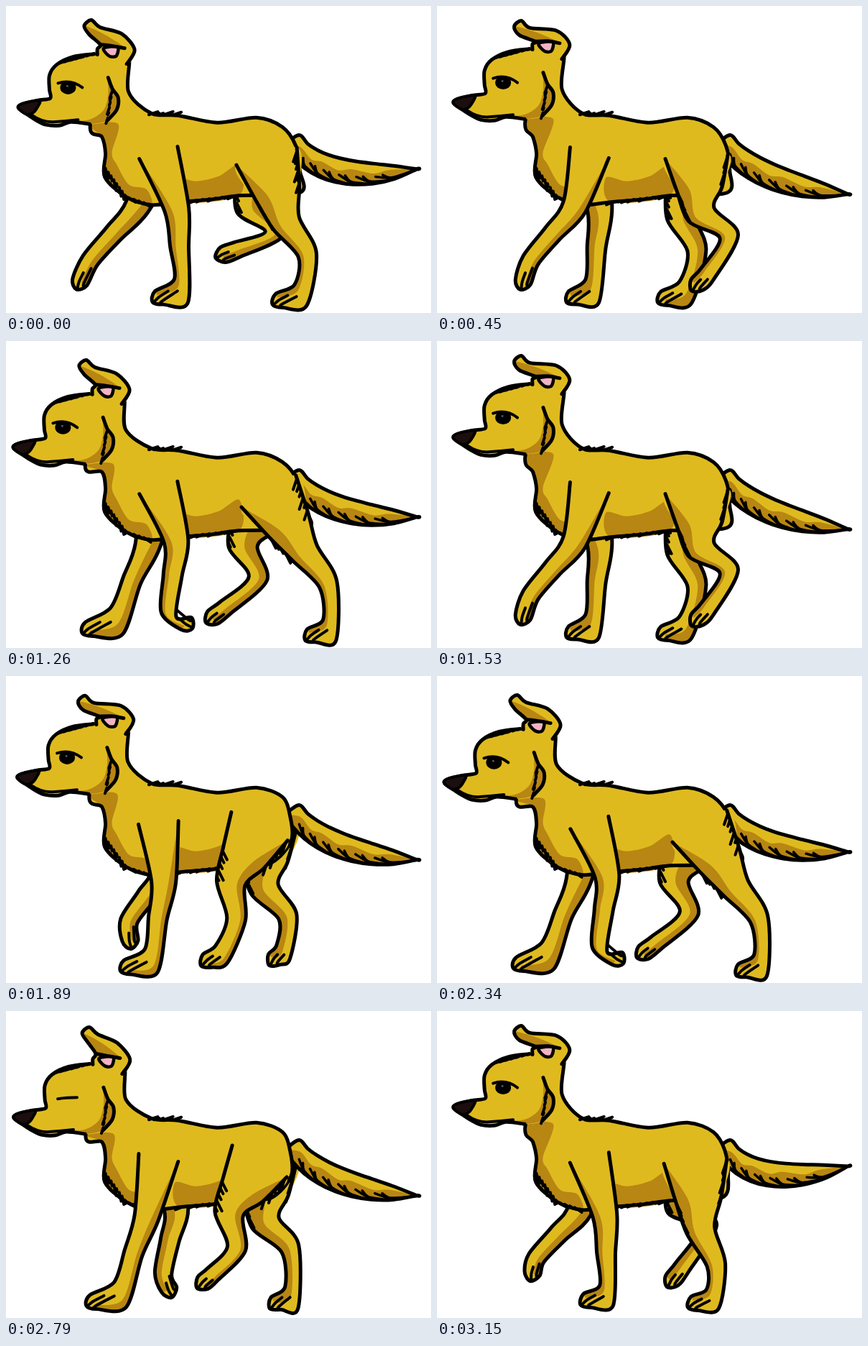
These frames come from a looping animation (592x427 px, 3240 ms). An HTML page:

```html
<!DOCTYPE html>
<html lang="en">
<head>
<meta charset="utf-8">
<title>Walking dog</title>
<style>
html, body { margin: 0; width: 100%; height: 100%; overflow: hidden; background: #fff; }
svg { display: block; width: 592px; height: 427px; }
</style>
</head>
<body>
<svg id="stage" viewBox="0 0 592 427" stroke-linecap="round" stroke-linejoin="round"></svg>
<script>
const STEP = 90, STEPS = 36, CYCLE = 12, BLINK = 31;
const GOLD = '#dfba1f', SHADE = '#b88612', INK = '#000', PINK = '#f3b3c4';
const stage = document.getElementById('stage');

// Key phases of the walk. A leg key holds its lower joint and its toe.
const PHASES = [0, 2, 5, 7, 10, 11];
const keys = text => text.split(' ').map(key => key.split(',').map(Number));
const walk = {
  foreNear: keys('246,387,214,408 228,375,252,395 131,355,120,386 160,387,122,407 225,388,195,406 238,389,210,405'),
  foreFar: keys('118,355,103,386 155,381,116,403 218,388,190,408 220,365,228,390 147,335,143,363 139,345,133,367'),
  hindNear: keys('421,348,382,412 450,340,427,412 408,322,363,390 322,332,275,380 336,345,300,408 390,355,360,409'),
  hindFar: keys('375,318,303,348 352,332,288,387 363,342,318,409 397,332,377,409 388,334,364,388 378,302,328,377'),
  tailTip: keys('228 246 263 258 251 217')
};

// Cyclic cubic interpolation between the keys.
function sample(list, phase) {
  const n = PHASES.length;
  const key = i => list[(i + n) % n];
  const time = i => PHASES[(i + n) % n] + CYCLE * Math.floor(i / n);
  let i = n - 1;
  while (PHASES[i] > phase) i--;
  const span = time(i + 1) - time(i), u = (phase - time(i)) / span;
  const slope = (j, k) => (key(j + 1)[k] - key(j - 1)[k]) / (time(j + 1) - time(j - 1)) * span;
  return key(i).map((value, k) =>
    (1 + 2 * u) * (1 - u) ** 2 * value + u * (1 - u) ** 2 * slope(i, k) +
    u * u * (3 - 2 * u) * key(i + 1)[k] + u * u * (u - 1) * slope(i + 1, k));
}

const pts = text => keys(text);
const mix = (a, b, t) => [a[0] + (b[0] - a[0]) * t, a[1] + (b[1] - a[1]) * t];
const add = (p, x, y) => [p[0] + x, p[1] + y];
const clamp = (v, lo, hi) => Math.max(lo, Math.min(hi, v));
const num = v => v.toFixed(1);
const wave = (phase, peak) => Math.cos((phase - peak) * Math.PI / 3);

// Unit normal of a to b; it points to the dog's front when b lies below a.
function normal(a, b) {
  const dx = b[0] - a[0], dy = b[1] - a[1], d = Math.hypot(dx, dy) || 1;
  return [-dy / d, dx / d];
}

// Middle joint of a limb: it bulges out as the ends come closer than the full reach.
function bend(a, b, at, reach, amount) {
  const d = Math.hypot(b[0] - a[0], b[1] - a[1]);
  const bulge = Math.sqrt(Math.max(0, reach * reach - d * d)) * amount;
  const n = normal(a, b);
  return add(mix(a, b, at), n[0] * bulge, n[1] * bulge);
}

// Smooth curve through the points.
function curve(points, closed = false) {
  const n = points.length;
  const at = i => closed ? points[(i + n) % n] : points[clamp(i, 0, n - 1)];
  let d = 'M' + points[0].map(num);
  for (let i = 0; i < (closed ? n : n - 1); i++) {
    const [a, b, c, e] = [at(i - 1), at(i), at(i + 1), at(i + 2)];
    d += 'C' + [b[0] + (c[0] - a[0]) / 6.5, b[1] + (c[1] - a[1]) / 6.5,
      c[0] - (e[0] - b[0]) / 6.5, c[1] - (e[1] - b[1]) / 6.5, ...c].map(num);
  }
  return closed ? d + 'Z' : d;
}

const fill = (d, color) => `<path d="${d}" fill="${color}"/>`;
const ink = (d, width = 5) => `<path d="${d}" fill="none" stroke="${INK}" stroke-width="${width}"/>`;

// Row of hair strokes of uneven length between two points.
function fur(a, b, count, dx, dy, width = 4) {
  let d = '';
  for (let i = 0; i < count; i++) {
    const p = mix(a, b, (i + .5) / count), size = .7 + .4 * Math.sin(i * 2.4 + 1);
    d += `M${p.map(num)}l${num(dx * size)},${num(dy * size)}`;
  }
  return ink(d, width);
}

// Both sides of a chain of joints with the given half widths.
function sides(joints, widths) {
  const front = [], rear = [];
  joints.forEach((p, i) => {
    const a = normal(joints[Math.max(0, i - 1)], joints[Math.max(1, i)]);
    const b = normal(joints[Math.min(i, joints.length - 2)], joints[Math.min(i + 1, joints.length - 1)]);
    const x = a[0] + b[0], y = a[1] + b[1], k = widths[i] / (Math.hypot(x, y) || 1);
    front.push(add(p, x * k, y * k));
    rear.push(add(p, -x * k, -y * k));
  });
  return { front, rear };
}

function limb(joints, widths, depth) {
  const { front, rear } = sides(joints, widths);
  const last = joints.length - 1, toe = joints[last], ankle = joints[last - 1];
  const planted = clamp((toe[1] - 388) / 15, 0, 1);
  const n = normal(ankle, toe);
  const tip = add(toe, n[1] * 11, -n[0] * 11);
  rear[last - 1] = mix(rear[last - 1], [ankle[0] + 8, toe[1] + 7], planted);
  const outline = [...front, tip, ...[...rear].reverse()];
  const [dark, other] = toe[0] < joints[0][0] - 35 ? [rear, front] : [front, rear];
  const inner = dark.map((p, i) => mix(p, other[i], i ? depth : 0));
  const claw = shift => curve([
    mix(tip, rear[last], shift), mix(toe, front[last], .2 - shift),
    mix(mix(ankle, toe, .55), front[last], .2 - shift)]);
  return fill(curve(outline, true), GOLD) +
    fill(curve(dark) + curve(inner.reverse()).replace('M', 'L') + 'Z', SHADE) +
    ink(curve(outline)) + ink(claw(.1) + claw(.75), 4);
}

function foreleg([x, y, toeX, toeY], depth) {
  const shoulder = [213, 205], wrist = [x, y];
  const elbow = bend(shoulder, wrist, .45, 193, -.2);
  return limb([shoulder, elbow, mix(elbow, wrist, .5), wrist, [toeX, toeY]], [28, 17, 13, 12, 11], depth);
}

function hindleg([x, y, toeX, toeY], hip, depth) {
  const hock = [x, y], toe = [toeX, toeY];
  const knee = bend(hip, hock, .65, 155, .25);
  const ankle = add(mix(hock, toe, .75), clamp((toeY - 385) * .75, 2, 21), 0);
  const joints = [hip, mix(hip, knee, .55), knee, hock, ankle, toe], widths = [44, 32, 20, 13, 11, 11];
  const { front, rear } = sides(joints, widths);
  return limb(joints, widths, depth) +
    fur(front[1], front[2], 5, 6, 12) + fur(rear[0], rear[1], 6, -5, 15);
}

function tail(tipY) {
  const root = [400, 188], tip = [574, tipY], middle = [464, 232 + (tipY - 240) * .2];
  const control = add(mix(root, tip, .5), 2 * (middle[0] - 487), 2 * (middle[1] - (188 + tipY) / 2));
  const spine = [], widths = [];
  for (let u = 0; u < 1.01; u += .125) {
    spine.push(mix(mix(root, control, u), mix(control, tip, u), u));
    widths.push((12 + 5 * Math.sin(Math.PI * u)) * (1 - u ** 8));
  }
  const { front: lower, rear: upper } = sides(spine, widths);
  let hair = '';
  for (let i = 1; i < 7; i++) {
    for (const t of [.15, .65]) {
      const from = mix(mix(lower[i], lower[i + 1], t), upper[i], .32);
      hair += curve([from, mix(lower[i + 1], from, .3), mix(lower[i + 1], lower[i + 2], t)]);
    }
  }
  const outline = [...upper, ...[...lower].reverse()];
  const dark = [...lower, ...spine.slice(1).reverse().map((p, i) => mix(p, upper[7 - i] || p, i % 2 * .25))];
  return fill(curve(outline, true), GOLD) + fill(curve(dark, true), SHADE) +
    ink(curve(outline, true)) + ink(hair, 3.5);
}

// Torso and neck; the neck follows the head and the rump follows the hind leg.
function body(bob, swing) {
  const neck = p => add(p, ...bob);
  const back = pts('203,150 240,153 295,163 350,156 386,169');
  const rump = [[403 + swing * .08, 195], [408 + swing * .12, 230], [402 + swing * .4, 261]];
  const belly = pts('325,265 290,270 243,274 203,278');
  const chest = pts('168,267 138,239 139,206 134,183');
  const throat = neck([119, 165]);
  const outline = [neck([173, 66]), add([172, 119], bob[0] * .6, bob[1] * .5), ...back, ...rump,
    ...belly, ...chest, throat, neck([148, 62])];
  const chestShade = [throat, ...[...chest].reverse(), belly[3],
    ...pts('196,256 172,250 155,222 148,205'), neck([158, 163])];
  const bellyShade = [belly[2], belly[0], ...pts('326,222 297,238 265,245 236,240')];
  return fill(curve(outline, true), GOLD) + fill(curve(chestShade, true), SHADE) +
    fill(curve(bellyShade, true), SHADE) + ink(curve(outline, true)) +
    fur([137, 224], chest[0], 8, 3, 14) + fur(chest[0], belly[3], 5, 9, 6) +
    fur(belly[0], belly[2], 9, -10, 4) + fur([196, 152], [238, 152], 6, 12, -4);
}

const skull = pts('150,66 125,65 95,69 72,80 62,95 62,115 63,127 45,130 22,136 19,141 30,149 44,158 57,164 76,165 92,160 118,163');
const cheek = pts('144,98 150,114 158,126 156,143 143,158');
const nose = pts('18,140 25,134 48,130 45,140 38,148 29,149');

function head(bob, shut, droop) {
  const eye = shut ? ink('M80,114Q92,112 107,112', 4) :
    '<ellipse cx="88" cy="112" rx="11" ry="9.5"/>' + ink('M74,106Q92,100 108,112', 4) +
    '<circle cx="87" cy="110" r="1.5" fill="#55555c"/>';
  const tip = [118 - 11 * droop, 19 + 12 * droop];
  const rim = [add(tip, -5, 4), add(tip, 5, -4), add(tip, 17, 6)];
  const fold = add(tip, 2, 16), crease = [133, 51 + 4 * droop], hinge = [167, 57];
  const ear = [[129, 66], [129, 58], crease, fold, ...rim, [163, 36 + 4 * droop], [181, 59], [170, 79]];
  const pink = pts('138,57 157,55 156,67 149,69 142,65');
  return `<g transform="translate(${bob.map(num)})">` +
    fill(curve([...skull, ...pts('140,160 154,146 156,120 156,85')], true), GOLD) +
    fill(curve([...cheek, ...pts('118,163 92,161 120,156 138,143 144,122')], true), SHADE) +
    ink(curve(skull.slice(1))) + ink(curve(cheek)) + fur(cheek[1], cheek[4], 6, -3, 9) +
    fur([72, 79], [125, 65], 7, 12, -4) + ink('M38,151Q52,161 68,160T102,157', 4) +
    fill(curve(nose, true), '#1c0e0e') + ink(curve(nose, true), 4) + eye +
    fill(curve(ear, true), GOLD) +
    fill(curve([crease, fold, rim[0], mix(tip, hinge, .45), hinge], true), SHADE) +
    fill(curve(pink, true), PINK) + ink(curve(pink, true), 4.5) +
    ink(curve([crease, [150, 54], hinge])) + ink(curve(ear)) + '</g>';
}

function draw(step) {
  const phase = step % CYCLE;
  const pose = {};
  for (const part in walk) pose[part] = sample(walk[part], phase);
  const bob = [-2 + 7 * wave(phase, 4.6), 2 - 8 * wave(phase, 4.5)];
  const droop = .55 - .65 * wave(phase, 1);
  const swing = pose.hindNear[0] - 400;
  stage.innerHTML = '<g transform="scale(.997 .995)">' +
    hindleg(pose.hindFar, [362, 212], .45) + foreleg(pose.foreFar, .4) +
    tail(pose.tailTip[0]) + body(bob, swing) +
    hindleg(pose.hindNear, [362 + swing * .1, 210], .28) + foreleg(pose.foreNear, .3) +
    head(bob, step === BLINK, droop) + '</g>';
}

const start = performance.now();
let shown = -1;
function tick(now) {
  const step = Math.floor(Math.max(0, now - start) / STEP) % STEPS;
  if (step !== shown) draw(shown = step);
  requestAnimationFrame(tick);
}
tick(start);
</script>
</body>
</html>
```
